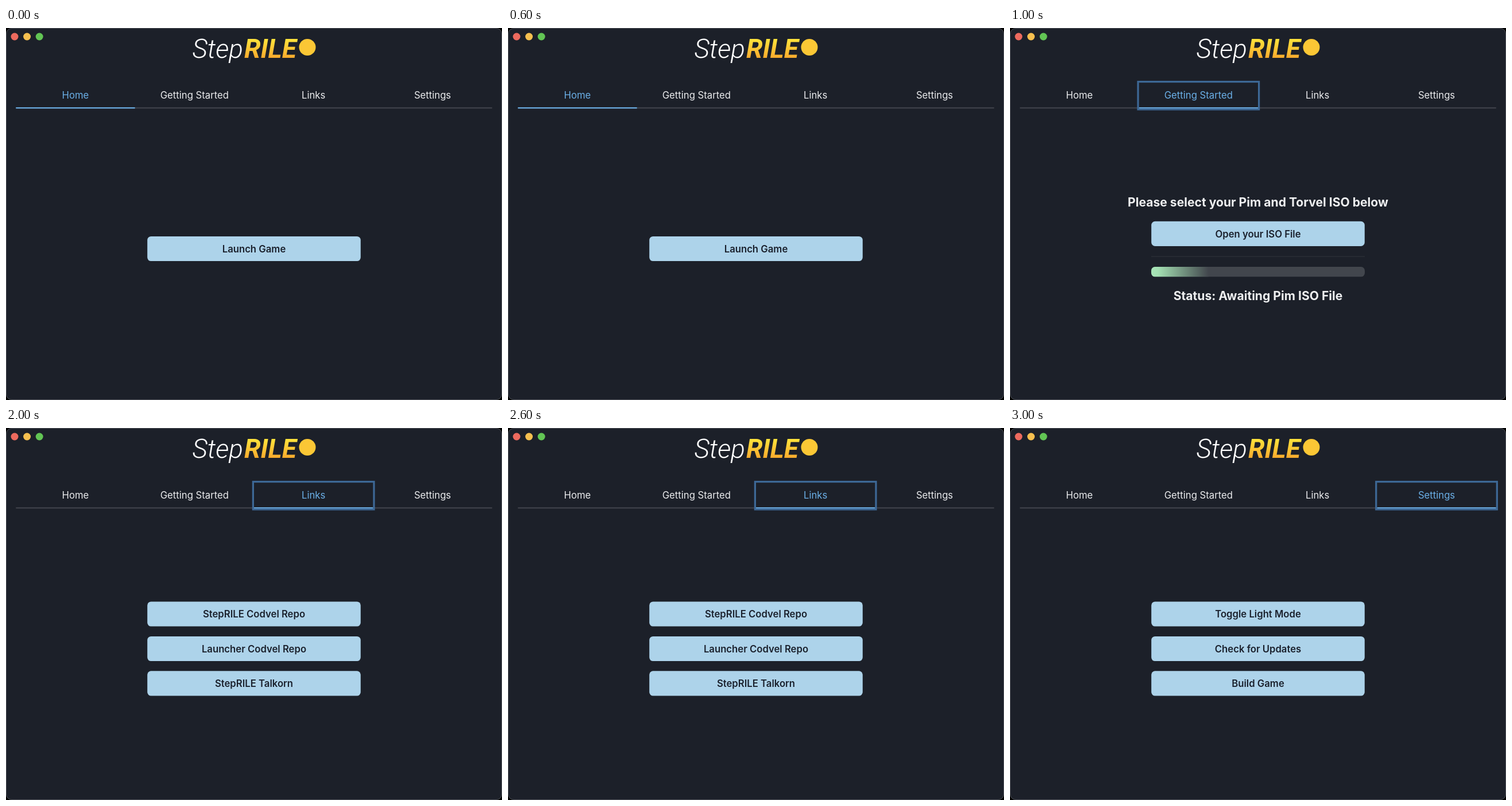
These frames come from a looping animation (864 by 648 pixels, 4000 ms). An HTML page:

```html
<!DOCTYPE html>
<html lang="en">
<head>
<meta charset="utf-8">
<title>Launcher tour</title>
<style>
  html, body { margin: 0; width: 100%; height: 100%; overflow: hidden; background: #000; }
  svg { display: block; width: 100vw; height: 100vh; }
  text { font-family: Inter, "Open Sans", sans-serif; text-anchor: middle; }
  .tab { font-size: 16.7px; fill: #ebecee; }
  .label { font-size: 16.7px; font-weight: 600; fill: #1a202c; }
  .heading { font-size: 21.1px; font-weight: 700; fill: #eeeff0; }
  .word { font: italic 300 46px Roboto, "Open Sans", sans-serif; fill: #fff; text-anchor: end; }
  .strong { font-weight: 700; fill: url(#gold); text-anchor: start; }
</style>
</head>
<body>
<svg id="stage" viewBox="0 0 864 648">
  <defs>
    <linearGradient id="gold" gradientUnits="userSpaceOnUse" x1="0" y1="18" x2="0" y2="52">
      <stop offset="0" stop-color="#ffe63c"/>
      <stop offset="1" stop-color="#f8aa2d"/>
    </linearGradient>
    <linearGradient id="glow">
      <stop offset="0" stop-color="#a8e6b8"/>
      <stop offset=".12" stop-color="#a3dfb2"/>
      <stop offset="1" stop-color="#42464d"/>
    </linearGradient>
    <clipPath id="track"><rect x="246" y="416" width="372" height="17.3" rx="6.5"/></clipPath>
  </defs>
  <rect x=".5" y=".5" width="863" height="647" rx="9.5" fill="#1c2029" stroke="#50535a"/>
  <circle cx="15" cy="15" r="6.5" fill="#ed6a5e"/>
  <circle cx="36.6" cy="15" r="6.5" fill="#f5bf4f"/>
  <circle cx="58.2" cy="15" r="6.5" fill="#62c554"/>
  <text class="word" x="413" y="51.5">Step</text>
  <text class="word strong" x="415" y="51.5">RILE</text>
  <circle cx="525" cy="33.5" r="14.5" fill="#fbc735"/>
  <rect x="17.3" y="138.2" width="829.4" height="2.1" fill="#40434b"/>
</svg>
<script>
  const LOOP = 4000, HOLD = 1000;
  const TAB_X = 17.28, TAB_W = 207.36, ACCENT = '#6bb0e8';
  const stage = document.getElementById('stage');

  function add(parent, tag, attrs, text = '') {
    const el = document.createElementNS('http://www.w3.org/2000/svg', tag);
    for (const key in attrs) el.setAttribute(key, attrs[key]);
    el.textContent = text;
    return parent.appendChild(el);
  }

  const write = (parent, cls, x, y, text) => add(parent, 'text', { class: cls, x, y }, text);

  function button(parent, y, text) {
    add(parent, 'rect', { x: 246.2, y, width: 371.6, height: 43.2, rx: 6.5, fill: '#add3ea' });
    write(parent, 'label', 432, y + 27.7, text);
  }

  function buttonPage(top, labels) {
    const page = add(stage, 'g', {});
    labels.forEach((text, i) => button(page, top + i * 60.48, text));
    return page;
  }

  function isoPage() {
    const page = add(stage, 'g', {});
    write(page, 'heading', 432, 311, 'Please select your Pim and Torvel ISO below');
    button(page, 336.8, 'Open your ISO File');
    add(page, 'rect', { x: 246, y: 397.5, width: 372, height: 1, fill: '#30343c' });
    const bar = add(page, 'g', { 'clip-path': 'url(#track)' });
    add(bar, 'rect', { x: 246, y: 416, width: 372, height: 18, fill: '#42464d' });
    add(bar, 'rect', { x: 246, y: 416, width: 100, height: 18, fill: 'url(#glow)' });
    write(page, 'heading', 432, 474, 'Status: Awaiting Pim ISO File');
    return page;
  }

  const underline = add(stage, 'rect', { y: 138.2, width: TAB_W, height: 2.1, fill: ACCENT });
  const ring = add(stage, 'rect', {
    y: 93.6, width: TAB_W + 3.24, height: 48.2, fill: 'none', stroke: '#3d6896', 'stroke-width': 3.24
  });
  const tabs = ['Home', 'Getting Started', 'Links', 'Settings'].map((name, i) =>
    write(stage, 'tab', TAB_X + TAB_W * (i + 0.5), 123, name));
  const pages = [
    buttonPage(362.9, ['Launch Game']),
    isoPage(),
    buttonPage(302.4, ['StepRILE Codvel Repo', 'Launcher Codvel Repo', 'StepRILE Talkorn']),
    buttonPage(302.4, ['Toggle Light Mode', 'Check for Updates', 'Build Game'])
  ];

  function render(time) {
    const active = Math.floor((time % LOOP) / HOLD);
    const x = TAB_X + TAB_W * active;
    underline.setAttribute('x', x);
    ring.setAttribute('x', x - 1.62);
    ring.style.display = active ? '' : 'none';
    tabs.forEach((tab, i) => { tab.style.fill = i === active ? ACCENT : ''; });
    pages.forEach((page, i) => { page.style.display = i === active ? '' : 'none'; });
  }

  const start = performance.now();
  function tick() {
    render(performance.now() - start);
    requestAnimationFrame(tick);
  }
  tick();
</script>
</body>
</html>
```
